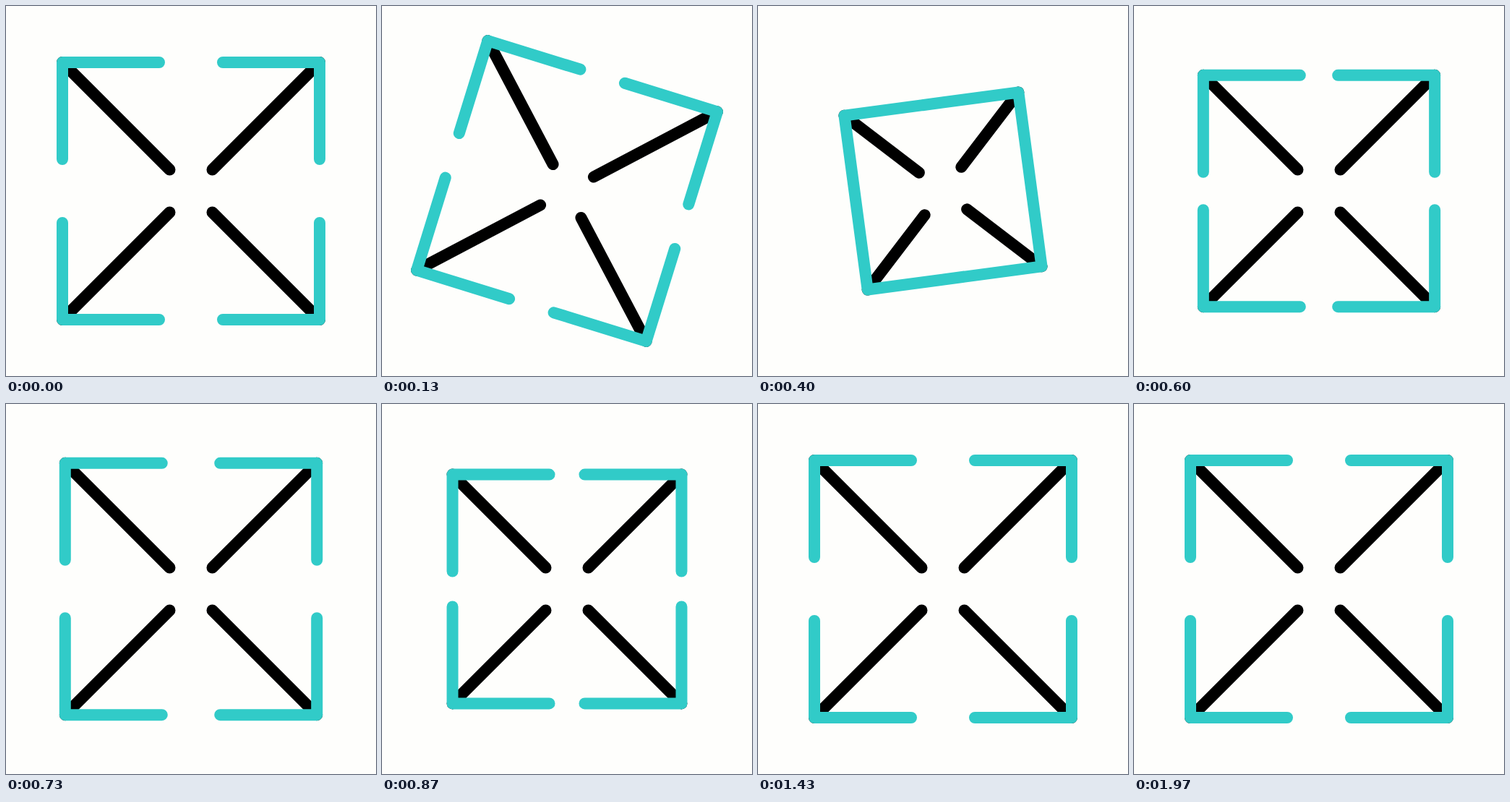
Animation, 512 px wide and 512 px high, one loop 2.01 s. Source, as an HTML page:

```html
<!DOCTYPE html>
<html lang="en">
<head>
<meta charset="utf-8">
<title>Expand arrows</title>
<style>
  html, body { margin: 0; width: 100%; height: 100%; overflow: hidden; background: #fefefc; }
  svg { display: block; width: 100vw; height: 100vh; }
  path { fill: none; stroke-width: 16; stroke-linecap: round; stroke-linejoin: round; }
  .shaft { stroke: #000; }
  .corner { stroke: #31cbc8; }
</style>
</head>
<body>
<svg viewBox="-256 -256 512 512">
  <g id="icon">
    <path class="shaft" id="shafts"/>
    <path class="corner" id="corners"/>
  </g>
</svg>
<script>
  const LOOP = 2010, STEP = 100 / 3, LAST = 59;
  const ARM = 134, INNER = 29.5;
  const QUADRANTS = [[-1, -1], [1, -1], [1, 1], [-1, 1]];
  const SPIN_STEPS = 15;
  // Corner distance from the centre: [step, distance]
  const KEYS = [[0, 178], [15, 116.3], [20, 184], [25, 156.2], [30, 178]];

  const icon = document.getElementById('icon');
  const shafts = document.getElementById('shafts');
  const corners = document.getElementById('corners');

  // Cubic Bezier easing with flat ends: (a, 0, b, 1)
  function ease(x, a, b) {
    let lo = 0, hi = 1;
    for (let i = 0; i < 24; i++) {
      const t = (lo + hi) / 2, r = 1 - t;
      if (3 * r * r * t * a + 3 * r * t * t * b + t * t * t < x) lo = t;
      else hi = t;
    }
    return lo * lo * (3 - 2 * lo);
  }

  const spinEase = x => ease(x, 0.325, 0.61);
  const bounceEase = x => ease(x, 1 / 3, 2 / 3);

  function distance(step) {
    const i = KEYS.findIndex(key => step < key[0]);
    if (i < 0) return KEYS[KEYS.length - 1][1];
    const [s0, d0] = KEYS[i - 1], [s1, d1] = KEYS[i];
    const x = (step - s0) / (s1 - s0);
    return d0 + (d1 - d0) * (i === 1 ? spinEase(x) : bounceEase(x));
  }

  function draw(step) {
    const d = distance(step);
    const angle = step < SPIN_STEPS ? 90 * spinEase(step / SPIN_STEPS) : 0;
    icon.setAttribute('transform', `rotate(${angle})`);
    shafts.setAttribute('d', QUADRANTS.map(([x, y]) =>
      `M${x * INNER} ${y * INNER}L${x * d} ${y * d}`).join(''));
    corners.setAttribute('d', QUADRANTS.map(([x, y]) =>
      `M${x * (d - ARM)} ${y * d}H${x * d}V${y * (d - ARM)}`).join(''));
  }

  const start = performance.now();
  function tick() {
    const time = (performance.now() - start) % LOOP;
    // Poses are held at 30 per second
    draw(Math.min(LAST, Math.floor(time / STEP + 0.1)));
    requestAnimationFrame(tick);
  }
  tick();
</script>
</body>
</html>
```
